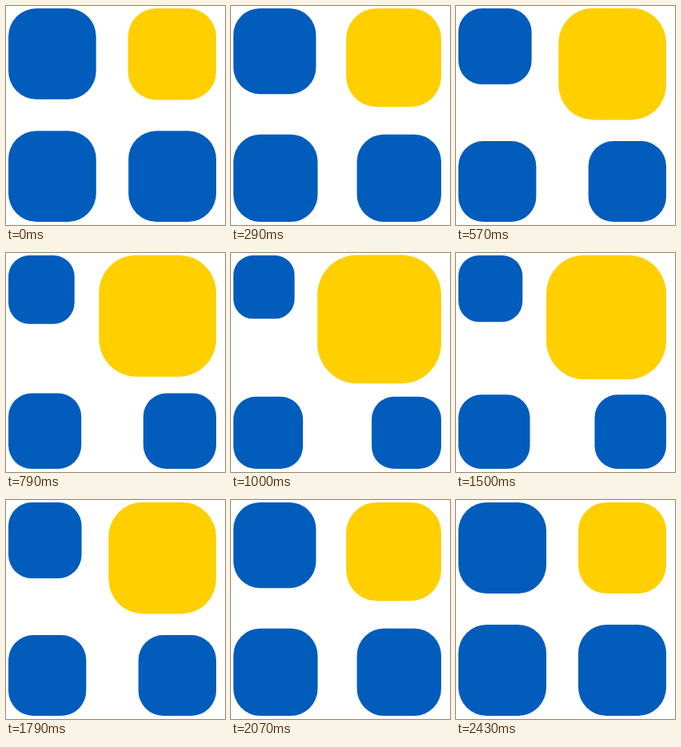
These frames come from a looping animation (274x274 px, 7210 ms). An HTML page:

```html
<!DOCTYPE html>
<html lang="en">
<head>
<meta charset="utf-8">
<title>Four pulsing tiles</title>
<style>
  html, body { margin: 0; height: 100%; overflow: hidden; background: #fff; }
  svg { display: block; width: 100%; height: 100%; }
</style>
</head>
<body>
<svg viewBox="0 0 274 274"></svg>
<script>
const LOOP = 7210, FPS = 14, LAST_STEP = 34;
const BLUE = '#025cbc', YELLOW = '#ffcf00';

// Each tile scales about its outer corner (ax, ay) from 1 to peak and back.
const tiles = [
  { x: 3, y: 3, ax: 3, ay: 3, peak: 0.68, color: BLUE },
  { x: 153, y: 3, ax: 263, ay: 4, peak: 1.43, color: YELLOW },
  { x: 3, y: 156, ax: 3, ay: 270, peak: 0.78, color: BLUE },
  { x: 153, y: 156, ax: 263, ay: 270, peak: 0.78, color: BLUE },
];

const svg = document.querySelector('svg');
for (const tile of tiles) {
  tile.node = document.createElementNS(svg.namespaceURI, 'rect');
  const attributes = { x: tile.x, y: tile.y, width: 110, height: 114, rx: 35, ry: 35.5, fill: tile.color };
  for (const [name, value] of Object.entries(attributes)) tile.node.setAttribute(name, value);
  svg.append(tile.node);
}

function draw(time) {
  const step = Math.min(LAST_STEP, Math.floor((time % LOOP + 5) * FPS / 1000));
  const progress = (1 - Math.cos(2 * Math.PI * (step + 1) / (LAST_STEP + 1))) / 2;
  for (const { node, ax, ay, peak } of tiles) {
    const scale = 1 + (peak - 1) * progress;
    node.setAttribute('transform', `translate(${ax} ${ay}) scale(${scale}) translate(${-ax} ${-ay})`);
  }
}

const start = performance.now();
function tick() {
  draw(performance.now() - start);
  requestAnimationFrame(tick);
}
tick();
</script>
</body>
</html>
```
